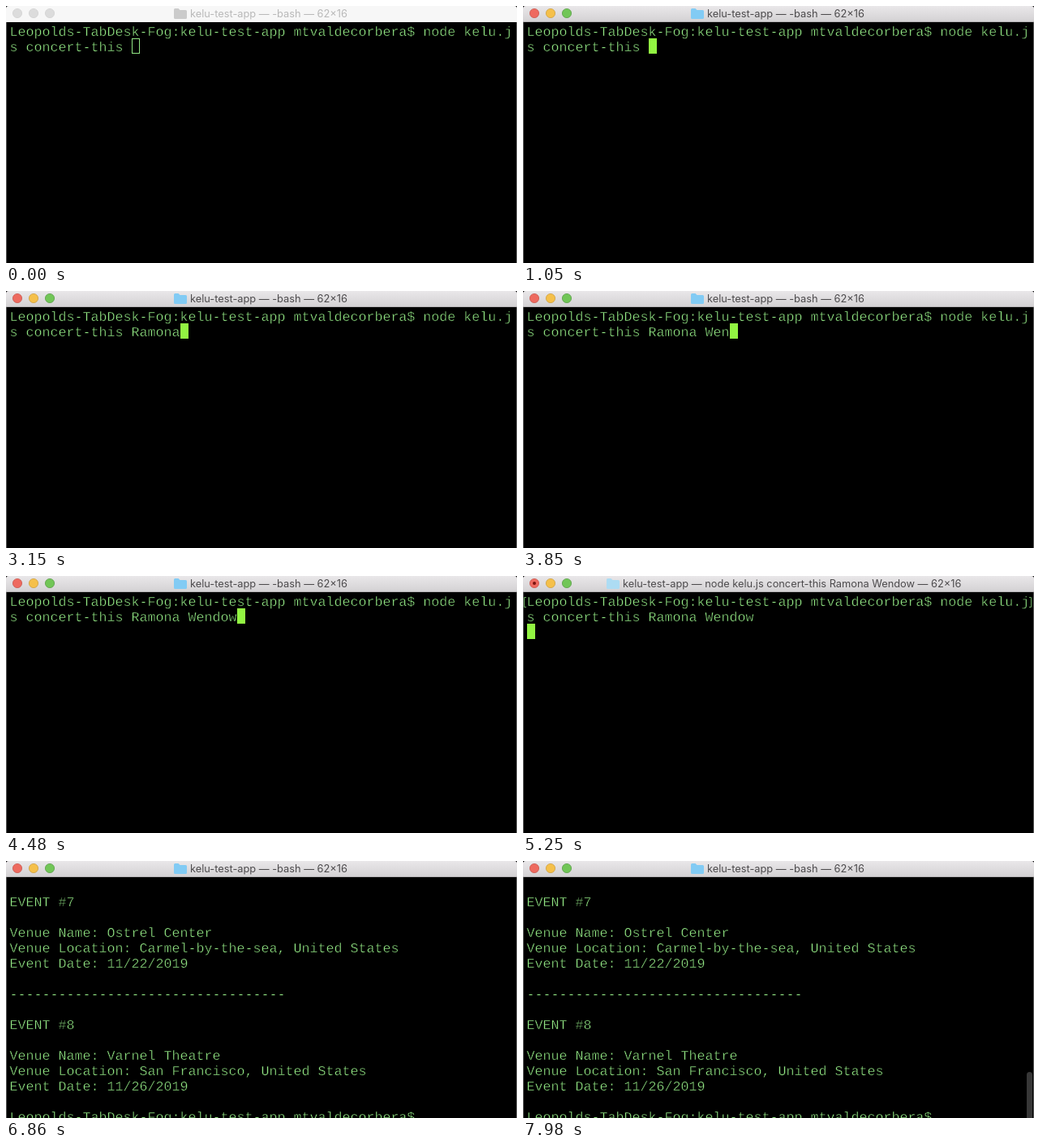
An HTML page for the animation above (8 s loop, 630 by 318 pixels).

```html
<!DOCTYPE html>
<html lang="en">
<head>
<meta charset="utf-8">
<title>Terminal</title>
<style>
  html, body { margin: 0; width: 100%; height: 100%; overflow: hidden; background: #000; }
  svg { display: block; width: 630px; height: 318px; }
  text { white-space: pre; }
  /* the black outline thins the letters */
  .screen text {
    font: 16.667px "Liberation Mono", monospace; fill: #92e684;
    stroke: #000; stroke-width: .4px; text-rendering: geometricPrecision;
  }
  #title { font: 12.8px Inter, sans-serif; fill: #4c4a4c; }
  .idle #title { fill: #b9b9b9; }
  #folder { fill: #82cbf4; }
  .busy #folder { fill: #addcf3; }
  .idle #folder { fill: #cbcbcb; }
  .idle .lights circle { fill: #dcdcdc; stroke: #d2d2d2; }
  .idle #bar { fill: #f7f7f7; }
  .idle #edge { fill: #f0f0f0; }
  #cursor { fill: #92f442; }
  .idle #cursor { fill: none; stroke: #92e684; }
  #marks, #dot { display: none; }
  .busy #dot, .entered #marks { display: block; }
</style>
</head>
<body>
<svg id="stage" viewBox="0 0 630 318">
  <defs>
    <linearGradient id="metal" x2="0" y2="1">
      <stop stop-color="#e9e7e9"/>
      <stop offset="1" stop-color="#d3d1d3"/>
    </linearGradient>
  </defs>
  <rect width="630" height="318"/>
  <path d="M.5 20V318M629.5 20V318" stroke="#585858"/>
  <g class="screen">
    <g id="lines"></g>
    <path id="marks" d="M4 26.5H1.5V38.5H4M624 26.5H626.500V38.5H624" fill="none" stroke="#69a760"/>
    <rect id="cursor" width="10" height="19"/>
  </g>
  <rect id="thumb" x="621" y="261" width="7" height="64" rx="3.5" fill="#777"/>
  <path id="bar" d="M0 20V3Q0 0 3 0H627Q630 0 630 3V20Z" fill="url(#metal)"/>
  <rect id="edge" y="19" width="630" height="1" fill="#b5b3b5"/>
  <g class="lights" stroke-width=".8">
    <circle cx="14" cy="9" r="5.6" fill="#ee6a5f" stroke="#c9574e"/>
    <circle cx="34" cy="9" r="5.6" fill="#f5c04a" stroke="#cfa040"/>
    <circle cx="54" cy="9" r="5.6" fill="#71c657" stroke="#5a9f48"/>
  </g>
  <circle id="dot" cx="14" cy="9" r="2" fill="#79140f"/>
  <path id="folder" d="M0 4.500Q0 3 1.500 3H5.500L7.500 5H14.500Q16 5 16 6.500V14.500Q16 16 14.500 16H1.500Q0 16 0 14.500Z"/>
  <text id="title" y="14"></text>
</svg>
<script>
const LOOP = 8000, FOCUS = 1050, ENTER = 4690, OUTPUT = 5530, DONE = 5880;
const $ = id => document.getElementById(id);
const prompt = 'Leopolds-TabDesk-Fog:kelu-test-app mtvaldecorbera$ ';
const artist = 'Ramona Wendow';
const keyTimes = [2240, 2380, 2590, 2730, 2870, 3010, 3220, 3500, 3640, 3780, 4060, 4200, 4340];
const hidden = [[1470, 2100], [6720, 7350], [7840, LOOP]];

const event = (n, venue, place, date) => [
  '', 'EVENT #' + n, '', 'Venue Name: ' + venue,
  'Venue Location: ' + place + ', United States', 'Event Date: ' + date, ''
];
const output = [
  ...event(7, 'Ostrel Center', 'Carmel-by-the-sea', '11/22/2019'),
  '-'.repeat(34),
  ...event(8, 'Varnel Theatre', 'San Francisco', '11/26/2019'),
  prompt
];

const rows = output.map((_, i) => {
  const row = document.createElementNS('http://www.w3.org/2000/svg', 'text');
  row.setAttribute('x', 4.6);
  row.setAttribute('y', 37 + 19 * i);
  return $('lines').appendChild(row);
});

const clamp = v => Math.max(0, Math.min(1, v));
const setText = (el, s) => { if (el.textContent !== s) el.textContent = s; };

function placeCursor(col, row, idle) {
  const inset = idle ? 0.5 : 0, c = $('cursor');
  c.setAttribute('x', 5 + col * 10 + inset);
  c.setAttribute('y', 21 + row * 19 + inset);
  c.setAttribute('width', 10 - 2 * inset);
  c.setAttribute('height', 19 - 2 * inset);
}

function draw(t) {
  const idle = t < FOCUS, busy = t >= ENTER && t < DONE;
  const entered = t >= ENTER && t < OUTPUT;
  $('stage').setAttribute('class', [idle && 'idle', busy && 'busy', entered && 'entered'].filter(Boolean).join(' '));

  const typed = artist.slice(0, keyTimes.filter(k => k <= t).length);
  const second = 's concert-this ' + typed;
  const lines = t < OUTPUT ? [prompt + 'node kelu.j', second] : output;
  rows.forEach((row, i) => setText(row, lines[i] || ''));

  if (t >= OUTPUT) placeCursor(prompt.length, 15);
  else if (entered) placeCursor(0, 2);
  else placeCursor(second.length, 1, idle);
  $('cursor').style.opacity = hidden.some(([a, b]) => t >= a && t < b) ? 0 : 1;

  const job = busy ? 'node kelu.js concert-this ' + artist : '-bash';
  setText($('title'), `kelu-test-app — ${job} — 62×16`);
  $('title').setAttribute('x', busy ? 123 : 227);
  $('folder').setAttribute('transform', `translate(${busy ? 103 : 207} 0)`);

  $('thumb').style.opacity = clamp((t - 6930) / 210) * clamp(1 - (t - 7770) / 390);
}

function tick(now) {
  draw(now % LOOP);
  requestAnimationFrame(tick);
}
draw(0);
requestAnimationFrame(tick);
</script>
</body>
</html>
```
